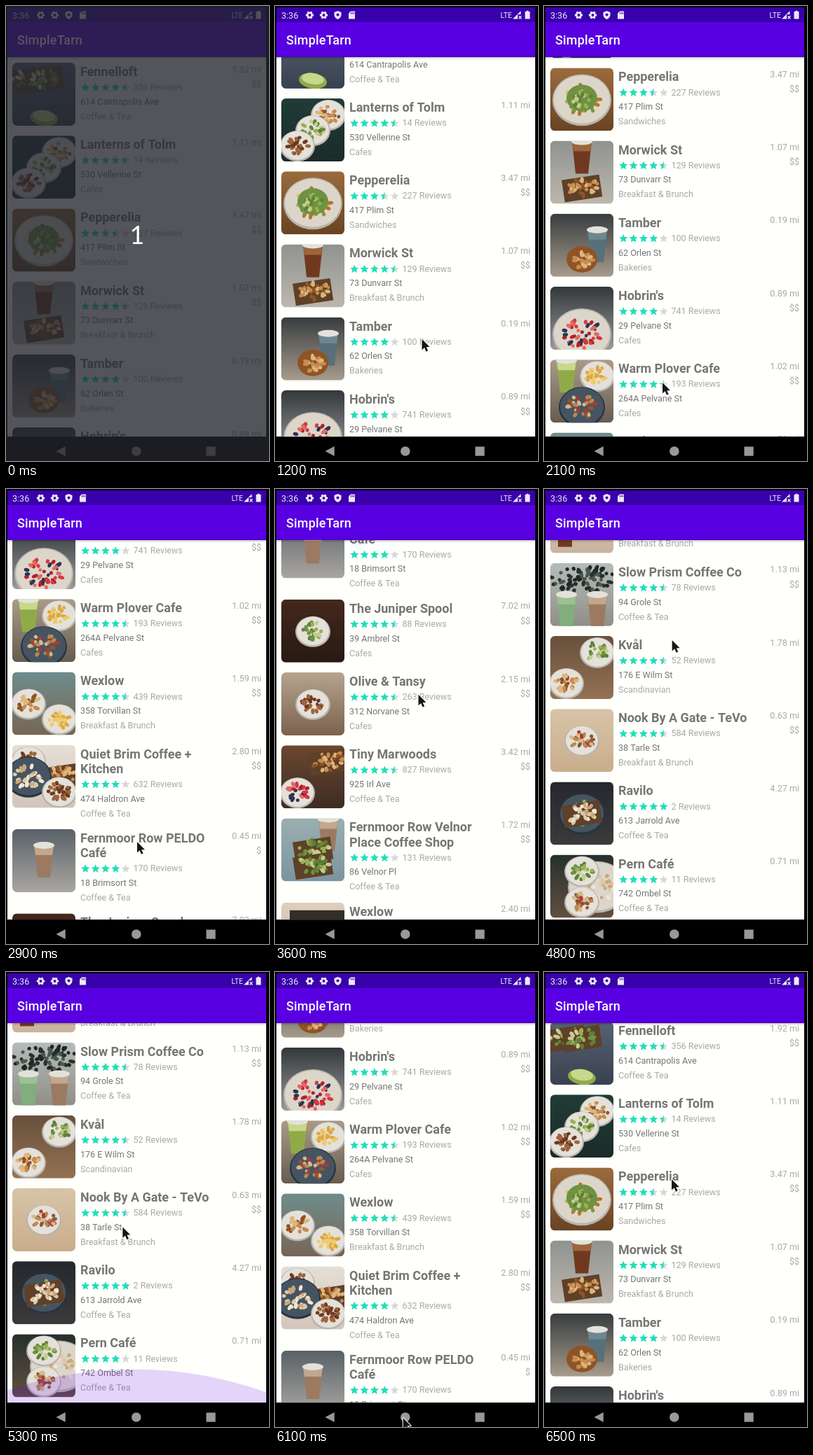
An HTML page with a canvas that plays this animation: 375x650 px, repeating every 6.6 s.

```html
<!DOCTYPE html>
<html lang="en">
<head>
<meta charset="utf-8">
<title>Café list</title>
<style>
html, body { margin: 0; width: 100%; height: 100%; overflow: hidden; background: #000; }
canvas { display: block; }
</style>
</head>
<body>
<canvas id="stage" width="375" height="650"></canvas>
<script>
const ctx = document.getElementById('stage').getContext('2d');
const LOOP = 6600, STEP = 100, SIZE = 90, LINE = 21.1, MAX_SCROLL = 1592;
const LEFT = 2, WIDTH = 369, LIST_TOP = 72.7, LIST_END = 615.4;
const BODY = 12.56, HEAD = 17.95, DARK = '#757575', LIGHT = '#a8a8a8', PALE = '#eee8fa', STATUS = '#3900ab';

// name (/ = line break) | address | kind | rating | reviews | distance | price | photo
// photo: two background colours, then shape-position-filling
const rows = `Fennelloft|614 Cantrapolis Ave|Coffee & Tea|4.5|356|1.92|$$|#566273 #39414f toast-nw-leaf toast-n-leaf slice-s-lime
Lanterns of Tolm|530 Vellerine St|Cafes|4.5|14|1.11||#203c36 #1b2b29 plate-ne-bread plate-c-leaf plate-sw-coffee
Pepperelia|417 Plim St|Sandwiches|3.5|227|3.47|$$|#9b6b3c #694323 big-c-chips ball-c-leaf
Morwick St|73 Dunvarr St|Breakfast & Brunch|4.5|129|1.07|$$|#8f9390 #bdb7ae cup-n-coffee toast-s-bread
Tamber|62 Orlen St|Bakeries|4|100|0.19||#383d40 #a79b8c cup-e-slate ball-s-bread
Hobrin's|29 Pelvane St|Cafes|4|741|0.89|$$|#33383b #999a9b big-s-berry
Warm Plover Cafe|264A Pelvane St|Cafes|4.5|193|1.02|$$|#a99b87 #665c50 cup-nw-lime plate-ne-egg bowl-s-oat
Wexlow|358 Torvillan St|Breakfast & Brunch|4.5|439|1.59|$$|#6e8d8c #776555 plate-w-bread plate-se-egg
Quiet Brim Coffee +/Kitchen|474 Haldron Ave|Coffee & Tea|4|632|2.80|$$|#e6ded6 #d2c5bc plate-nw-coffee toast-e-bread bowl-w-cream plate-se-coffee
Fernmoor Row PELDO/Café|18 Brimsort St|Coffee & Tea|4|170|0.45|$|#596168 #aaa6a1 cup-c-latte
The Juniper Spool|39 Ambrel St|Cafes|4.5|88|7.02|$$|#44281b #261a14 plate-c-leaf
Olive & Tansy|312 Norvane St|Cafes|4.5|263|2.15|$$|#b5a48e #7b624d plate-c-coffee
Tiny Marwoods|925 Irl Ave|Coffee & Tea|4.5|827|3.42|$$|#6c472f #3c2c24 toast-ne-bread plate-sw-berry
Fernmoor Row Velnor/Place Coffee Shop|86 Velnor Pl|Coffee & Tea|4|131|1.72|$$|#9aafb0 #7c94a0 cup-ne-latte toast-c-leaf toast-s-leaf
Wexlow|287 Mundon St|Breakfast & Brunch|4.5|35|2.40|$$|#dfcfbd #c9b29e shop-c-coffee
Slow Prism Coffee Co|94 Grole St|Coffee & Tea|4.5|78|1.13|$$|#b4bcba #908e87 bush-n-pine cup-sw-mint cup-se-latte
Kvål|176 E Wilm St|Scandinavian|4.5|52|1.78||#68503d #947253 plate-ne-leaf plate-sw-bread
Nook By A Gate - TeVo|38 Tarle St|Breakfast & Brunch|4.5|584|0.63|$$|#d7c4a8 #c9ad8b plate-c-oat
Ravilo|613 Jarrold Ave|Coffee & Tea|5|2|4.27||#25282d #3b3a3c bowl-c-leaf toast-c-cream
Pern Café|742 Ombel St|Coffee & Tea|4|11|0.71||#25302d #62503f big-e-cream plate-n-leaf plate-s-oat`.split('\n').map(s => {
  const [name, address, kind, rating, reviews, miles, price, photo] = s.split('|');
  return { lines: name.split('/'), address, kind, rating: +rating, reviews, miles, price, photo: photo.split(' ') };
});
let total = 0;
for (const r of rows) {
  r.y = total;
  total += r.lines.length > 1 ? 120.4 : 104.2;
}

// Each swipe drags the list from y to `to`, then it coasts to `rest` while the hand moves on
const swipes = [
  { t: 1100, end: 1300, x: 213, y: 528, to: 406, rest: 201 },
  { t: 2100, end: 2400, x: 168, y: 537, to: 347, rest: 549 },
  { t: 2900, end: 3300, x: 186, y: 503, to: 183, rest: 1080 },
  { t: 4100, end: 4500, x: 216, y: 530, to: 34, rest: MAX_SCROLL },
  { t: 5200, end: 5400, x: 162, y: 494, to: 194, rest: MAX_SCROLL },
  { t: 5500, end: 5700, x: 172, y: 150, to: 560, rest: 850 },
  { t: 5900, end: 6100, x: 182, y: 280, to: 636, rest: 10 },
  { t: 6500, end: LOOP, x: 181, y: 295, to: 295, rest: 10 }
];

const mix = (a, b, u) => a + (b - a) * u;
const clamp = (v, lo, hi) => Math.max(lo, Math.min(hi, v));
const ramp = (t, a, b) => clamp((t - a) / (b - a), 0, 1);

function pose(t) {
  const i = Math.max(0, swipes.findLastIndex(s => t >= s.t));
  const s = swipes[i], next = swipes[i + 1] || { ...s, t: LOOP };
  const from = i ? swipes[i - 1].rest : 0;
  const coast = ramp(t, s.end, next.t);
  const hand = mix(s.y, s.to, ramp(t, s.t, s.end) ** 1.2);
  const dragged = clamp(from + s.y - hand, 0, MAX_SCROLL);
  return {
    scroll: mix(dragged, s.rest, 1 - (1 - coast) ** 2),
    x: mix(s.x, next.x, ramp(t, s.t, next.t)),
    y: mix(hand, next.y, coast * coast * (3 - 2 * coast))
  };
}

function box(color, x, y, w, h) {
  ctx.fillStyle = color;
  ctx.fillRect(x, y, w, h);
}

function oval(color, x, y, rx, ry = rx, turn = 0) {
  ctx.fillStyle = color;
  ctx.beginPath();
  ctx.ellipse(x, y, rx, ry, turn, 0, 7);
  ctx.fill();
}

function shape(color, path) {
  ctx.fillStyle = color;
  ctx.fill(new Path2D(path));
}

function fade(top, bottom, x, y, w, h) {
  const g = ctx.createLinearGradient(0, y, 0, y + h);
  g.addColorStop(0, top);
  g.addColorStop(1, bottom);
  box(g, x, y, w, h);
}

const fillings = {
  leaf: ['#6f9142', '#5d8038', '#9ab052', '#c5cd92'],
  lime: ['#8fab48', '#c7d88a'],
  berry: ['#b3202c', '#d23b42', '#30334f', '#e26a62'],
  oat: ['#8a5a32', '#b98a54', '#d8b98a', '#a93c30'],
  bread: ['#8e5425', '#c98b50', '#dcb67c'],
  chips: ['#d69d3f', '#7b9b38', '#e9bb5d', '#b9722b'],
  egg: ['#dda83f', '#f0ca6b'],
  cream: ['#dcc8a8', '#f1e6d4', '#c9a67a'],
  coffee: ['#70391f', '#9c653b'],
  latte: ['#9c7a62', '#c2a78f'],
  slate: ['#57707a', '#6d8791'],
  mint: ['#82ad7c', '#9cc194'],
  pine: ['#28312d', '#4a5851', '#1f2623']
};

// Seeded scatter of small blobs inside an ellipse
function bits(colors, rx, ry, seed) {
  const rnd = () => (seed = (seed * 16807 + 11) % 2147483647) / 2147483647;
  rnd();
  for (let i = 0; i < rx * 1.5; i++) {
    const a = rnd() * 6.28, d = Math.sqrt(rnd());
    oval(colors[i % colors.length], Math.cos(a) * d * rx, Math.sin(a) * d * ry, 2 + rnd() * 3, 2.6, a);
  }
}

function dish(rim, base, r, colors, seed) {
  oval(rim, 0, 1, r, r * .88);
  oval(base, 0, 0, r - 2, r * .82);
  bits(colors, r * .62, r * .5, seed);
}

// Shapes are drawn around their own centre
const shapes = {
  plate: (c, n) => dish('#b9b4ac', '#e4e1da', 25, c, n),
  big: (c, n) => dish('#b9b4ac', '#dcd6ca', 42, c, n),
  bowl: (c, n) => dish('#26343f', '#465462', 33, c, n),
  slice: c => { oval(c[0], 0, 12, 20, 11, .15); oval(c[1], 0, 9, 16, 8, .15); },
  ball: (c, n) => { oval(c[0], 0, -2, 22, 19); bits(c.slice(1), 15, 11, n); },
  toast: (c, n) => { ctx.rotate(-.15); box('#5f4028', -27, -15, 54, 32); bits(c, 23, 13, n); },
  cup: c => {
    shape(c[0], 'M-14-22H14L9 24H-9Z');
    shape(c[1], 'M-14-22H14L12-8H-12Z');
    oval('#e4e1da', 0, -22, 15, 5);
  },
  bush: (c, n) => bits([...c, ...c], 46, 20, n),
  shop: c => {
    box('#332d2a', -33, -34, 78, 14);
    box(c[0], -34, -16, 20, 52);
    box('#eae0d2', -11, -16, 52, 37);
    for (let x = -8; x < 38; x += 9) box('#73614f', x, -13, 7, 30);
  }
};

function drawPhoto([top, bottom, ...items], seed) {
  fade(top, bottom, 0, 0, SIZE, SIZE);
  items.forEach((item, k) => {
    const [kind, at, fill] = item.split('-');
    const has = d => at.includes(d) ? 22 : 0;
    ctx.save();
    ctx.translate(45 + has('e') - has('w'), 45 + has('s') - has('n'));
    shapes[kind](fillings[fill], seed * 7 + k + 3);
    ctx.restore();
  });
}

function text(s, x, y, size = BODY, color = LIGHT, weight = 400, align = 'left') {
  ctx.font = `${weight} ${size}px Roboto, sans-serif`;
  ctx.textAlign = align;
  ctx.fillStyle = color;
  ctx.fillText(s, x, y);
}

const star = new Path2D('M12 17.27L18.18 21l-1.64-7.03L22 9.24l-7.19-.61L12 2 9.19 8.63 2 9.24l5.46 4.73L5.82 21z');

function drawStars(rating, x, y) {
  const u = 14.36;
  for (let i = 0; i < 5; i++) {
    ctx.save();
    ctx.translate(x + i * u, y);
    ctx.scale(u / 24, u / 24);
    ctx.fillStyle = '#d8d8d8';
    ctx.fill(star);
    ctx.beginPath();
    ctx.rect(0, 0, 24 * clamp(rating - i, 0, 1), 24);
    ctx.clip();
    ctx.fillStyle = '#1ce0ba';
    ctx.fill(star);
    ctx.restore();
  }
}

function drawRow(r, i, y) {
  ctx.save();
  ctx.translate(9, y);
  ctx.beginPath();
  ctx.roundRect(0, 0, SIZE, SIZE, 6.5);
  ctx.clip();
  drawPhoto(r.photo, i);
  ctx.restore();

  r.lines.forEach((s, k) => text(s, 106, y + 19 + k * LINE, HEAD, DARK, 700));
  const b = y + (r.lines.length - 1) * LINE;
  drawStars(r.rating, 106, b + 28);
  text(r.reviews + ' Reviews', 181.5, b + 39.2);
  text(r.address, 106, b + 59.8, BODY, DARK);
  text(r.kind, 106, b + 80.8);
  text(r.miles + ' mi', 364, y + 13.6, BODY, LIGHT, 400, 'right');
  text(r.price, 364, y + 34.7, BODY, LIGHT, 400, 'right');
}

// Overscroll glow at the end of the list
function drawGlow(t) {
  if (t < 5300) return;
  const k = 1 - ramp(t, 5400, 5900);
  ctx.globalAlpha = .17 * k;
  oval('#6200ee', 182, LIST_END - 48 * k + 555, 555);
  ctx.globalAlpha = 1;
}

function drawList(t, scroll) {
  ctx.save();
  ctx.beginPath();
  ctx.rect(LEFT, LIST_TOP, WIDTH, LIST_END - LIST_TOP);
  ctx.clip();
  box('#fffffc', LEFT, LIST_TOP, WIDTH, LIST_END - LIST_TOP);
  rows.forEach((r, i) => {
    const y = 81 + r.y - scroll;
    if (y > -60 && y < LIST_END) drawRow(r, i, y);
  });
  drawGlow(t);
  fade('rgba(0,0,0,.22)', 'rgba(0,0,0,0)', LEFT, LIST_TOP, WIDTH, 4);
  ctx.restore();
}

function drawGear(x, y) {
  ctx.save();
  ctx.translate(x, y);
  for (let i = 0; i < 3; i++) {
    box(PALE, -5.6, -1.5, 11.2, 3);
    ctx.rotate(Math.PI / 3);
  }
  ctx.restore();
  oval(PALE, x, y, 4.4);
  oval(STATUS, x, y, 1.9);
}

function drawBars() {
  box(STATUS, LEFT, 2, WIDTH, 21);
  box('#5800e2', LEFT, 23, WIDTH, LIST_TOP - 23);
  text('3:36', 9, 17.5, BODY, PALE);
  drawGear(49.5, 13);
  drawGear(69.5, 13);
  shape(PALE, 'M89.5 7L94.5 9V13Q94 17 89.5 19Q85 17 84.5 13V9Z');
  oval(STATUS, 89.5, 12.5, 2);
  shape(PALE, 'M108 7.5H114V18.5H105V10.5Z');
  for (let x = 108; x < 113; x += 2) box(STATUS, x, 9, 1, 2.5);
  text('LTE', 321.5, 17, 10.4, PALE);
  shape(PALE, 'M350.5 7V12H346V18.5H339Z');
  ctx.strokeStyle = PALE;
  ctx.lineWidth = 1.2;
  ctx.stroke(new Path2D('M347.5 14l4 4.5m0-4.5l-4 4.5'));
  shape(PALE, 'M356.5 8h2v-1.2h3V8h2v10.5h-7Z');
  ctx.letterSpacing = '0.22px';
  text('SimpleTarn', 16, 55, HEAD, '#fff', 500);
  ctx.letterSpacing = '0px';

  const gray = '#989898';
  box('#000', 0, LIST_END, 375, 35);
  shape(gray, 'M71.5 636L84.7 629V643Z');
  oval(gray, 185.8, 636, 6.8);
  box(gray, 285.5, 629.5, 13.2, 13.2);
}

const arrow = new Path2D('M1 1V16.5L4.6 13.2L7 18.8L9.6 17.7L7.2 12.2H12Z');

function drawCursor(x, y) {
  ctx.save();
  ctx.translate(x, y);
  ctx.lineJoin = 'round';
  ctx.strokeStyle = '#fff';
  ctx.lineWidth = 2;
  ctx.stroke(arrow);
  ctx.fillStyle = '#151515';
  ctx.fill(arrow);
  ctx.restore();
}

function drawCountdown(t) {
  ctx.globalAlpha = 1 - ramp(t, 400, 900);
  box('rgba(35,38,46,.78)', 0, 0, 375, 650);
  ctx.font = '36px Lato, sans-serif';
  ctx.textAlign = 'center';
  ctx.fillStyle = '#fff';
  ctx.fillText('1', 187, 340);
  ctx.globalAlpha = 1;
}

function draw(now) {
  const t = Math.floor(now % LOOP / STEP) * STEP;
  const p = pose(t);
  box('#000', 0, 0, 375, 650);
  drawList(t, p.scroll);
  drawBars();
  if (t >= 900) drawCursor(p.x, p.y);
  drawCountdown(t);
}

const start = performance.now();
function tick() {
  draw(performance.now() - start);
  requestAnimationFrame(tick);
}
tick();
</script>
</body>
</html>
```
